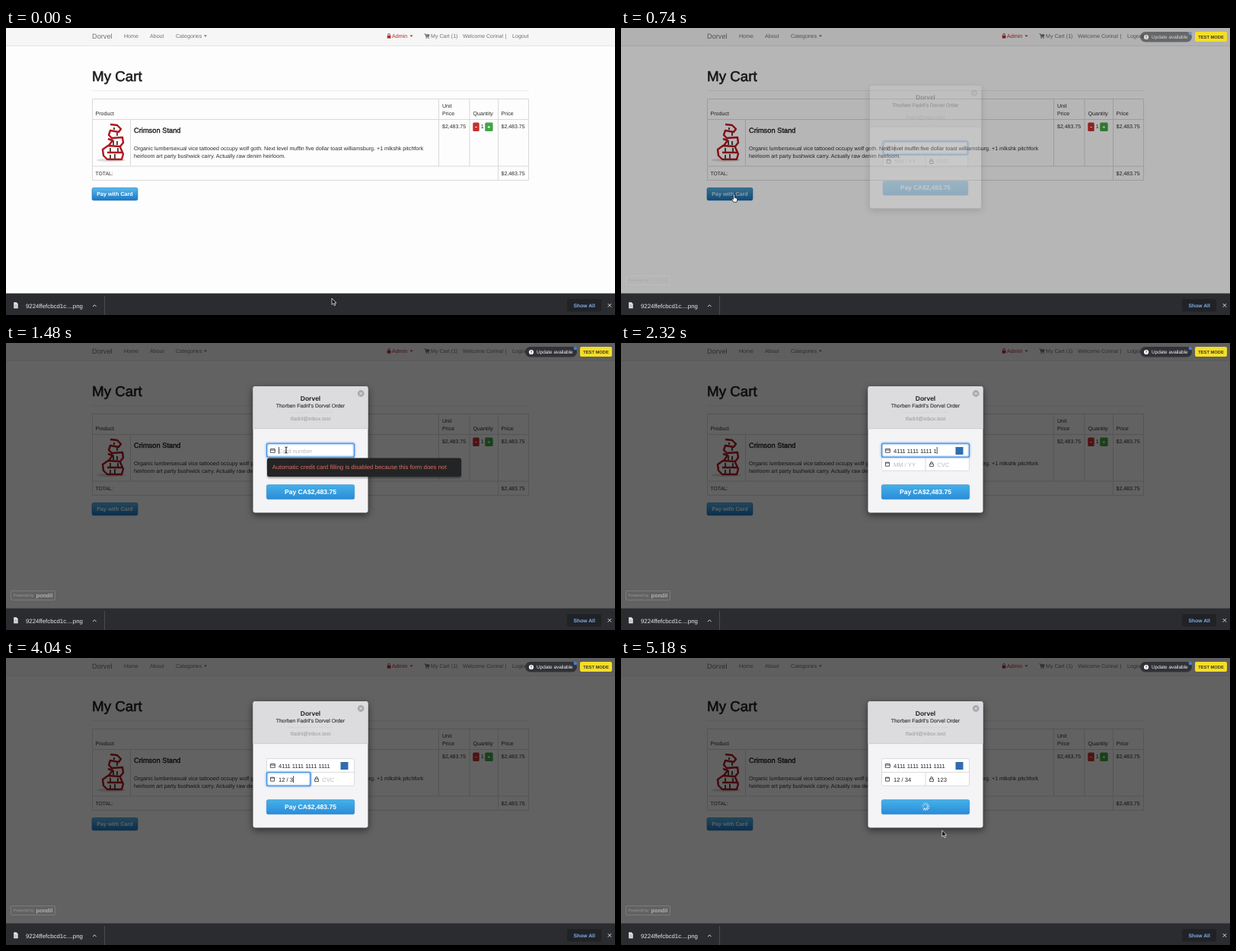
An HTML page that plays this animation: 800 px wide and 378 px high, repeating every 5200 ms.

```html
<!DOCTYPE html>
<html lang="en">
<head>
<meta charset="utf-8">
<title>Cart checkout</title>
<style>
html, body { margin: 0; width: 100%; height: 100%; overflow: hidden; background: #fff; }
svg { display: block; width: 100%; height: 100%; }
text { font: 7.1px "Liberation Sans", Arial, sans-serif; text-rendering: geometricPrecision; white-space: pre; fill: #2b2b2b; }
.nav text { fill: #707070; }
.nav .red { fill: #b3282d; }
.b { font-weight: bold; }
.mid { stroke: currentColor; stroke-width: .3px; }
.c { text-anchor: middle; }
.line { fill: none; stroke: #d9d9d9; }
#modal .in text { font-size: 7.6px; }
.icon { fill: none; stroke: #444; stroke-width: .9; }
</style>
</head>
<body>
<svg viewBox="0 0 800 378">
  <defs>
    <linearGradient id="blue" x2="0" y2="1"><stop stop-color="#58b9ed"/><stop offset="1" stop-color="#1a78c6"/></linearGradient>
    <linearGradient id="pay" x2="0" y2="1"><stop stop-color="#45b1e9"/><stop offset="1" stop-color="#2a8bd8"/></linearGradient>
    <filter id="soft" x="-30%" y="-30%" width="160%" height="160%"><feGaussianBlur stdDeviation="5"/></filter>
    <filter id="glow" x="-20%" y="-60%" width="140%" height="220%"><feGaussianBlur stdDeviation="1"/></filter>
  </defs>

  <rect width="800" height="350" fill="#fdfdfd"/>
  <g class="nav">
    <rect width="800" height="23" fill="#f6f6f6"/>
    <path d="M0 23.5H800" stroke="#e6e6e6"/>
    <text x="113" y="14" style="font-size:9.2px">Dorvel</text>
    <text x="155" y="13">Home</text>
    <text x="189" y="13">About</text>
    <text x="223" y="13">Categories</text>
    <path d="M260 9.5h4l-2 2.3z" fill="#666"/>
    <path d="M500.8 10h4.6v3.6h-4.6z" fill="#b3282d"/>
    <path d="M501.8 10v-1.3a1.3 1.3 0 0 1 2.6 0V10" fill="none" stroke="#b3282d" stroke-width=".9"/>
    <text class="red" x="507" y="13">Admin</text>
    <path d="M530.5 9.5h4l-2 2.3z" fill="#b3282d"/>
    <path d="M549.5 7.8h1.5l.8 4h3.8M551.3 8.8h4.8l-.5 2h-4z" fill="#666" stroke="#666" stroke-width=".7"/>
    <circle cx="552.2" cy="13.2" r=".8" fill="#666"/><circle cx="555.2" cy="13.2" r=".8" fill="#666"/>
    <text x="558" y="13">My Cart (1)</text>
    <text x="600" y="12.5" style="font-size:7px">Welcome Corina! |</text>
    <text x="665" y="13">Logout</text>
  </g>

  <text class="mid" x="113" y="70" style="font-size:18.8px;stroke-width:.5px">My Cart</text>
  <path d="M113 82.5H687" stroke="#ececec"/>
  <path class="line" d="M113.5 93.5H686.5V200.5H113.5ZM113.5 120.5H686.5M113.5 182H686.5M163.5 120.5V182M568.5 93.5V182M609 93.5V182M646.5 93.5V200.5"/>
  <g class="b">
    <text x="117.5" y="114.5">Product</text>
    <text x="573" y="105">Unit</text>
    <text x="573" y="114.5">Price</text>
    <text x="613.5" y="114.5">Quantity</text>
    <text x="650.5" y="114.5">Price</text>
    <text x="117.5" y="193.5" style="font-size:6.8px">TOTAL:</text>
    <text x="650.5" y="193.5" style="font-size:7px">$2,483.75</text>
  </g>
  <text class="mid" x="168" y="138" style="font-size:9.3px">Crimson Stand</text>
  <text x="168" y="161.3" style="font-size:7.15px">Organic lumbersexual vice tattooed occupy wolf goth. Next level muffin five dollar toast williamsburg. +1 mlkshk pitchfork</text>
  <text x="168" y="170.8" style="font-size:7.15px">heirloom art party bushwick carry. Actually raw denim heirloom.</text>
  <text x="573" y="132" style="font-size:7px">$2,483.75</text>
  <text x="650.5" y="132" style="font-size:7px">$2,483.75</text>
  <rect x="613.3" y="124.5" width="8.4" height="11.5" rx="1.5" fill="#c6302c"/>
  <path d="M616.2 130.5h2.6M632.6 130.5h3.2M634.2 129v3" stroke="#fff" stroke-width=".9"/>
  <text x="623.8" y="132.3">1</text>
  <rect x="629.2" y="124.5" width="10.4" height="11.5" rx="1.5" fill="#41a546"/>
  <path d="M632.6 130.5h3.4M634.3 128.8v3.4" stroke="#fff" stroke-width=".9"/>

  <g fill="none" stroke="#b3141f" stroke-width="2.4" stroke-linejoin="round">
    <ellipse cx="138" cy="174" rx="19" ry="2.2" fill="#ddd" stroke="none"/>
    <path d="M137 127l9 1 5 5-3 4-11-2-2 6 4 4 14-1 1 7-4 5-16-1-7 5 1 8 5 5h19l2-7-4-9M134 146l6 2-5 7M133 164h20"/>
    <path d="M142 134v-3M146 142v-4M141 154v-6M146 154v-5M137 163v-5M147 163v-5M137 172v-5M143 172v-6" stroke="#5a4a40" stroke-width="2"/>
  </g>

  <rect x="113" y="210.5" width="60" height="16.5" rx="2" fill="url(#blue)" stroke="#2476b5" stroke-width=".6"/>
  <text class="b c" x="143" y="221.3" style="font-size:7.2px;fill:#fff">Pay with Card</text>
  <rect id="press" x="113" y="210.5" width="60" height="16.5" rx="2" opacity=".15"/>

  <rect id="shade" width="800" height="350"/>
  <g id="extras">
    <rect x="6.5" y="326.5" width="58" height="12" rx="1.5" fill="none" stroke="#fff" stroke-opacity=".16"/>
    <text x="9.5" y="334" style="font-size:5.1px;fill:#989898">Powered by</text>
    <text class="b" x="39.5" y="335" style="font-size:7.3px;fill:#b0b0b0">pondil</text>
    <rect x="682" y="5" width="68" height="13.5" rx="6.7" fill="#303237"/>
    <circle cx="690" cy="12" r="3.1" fill="#fff"/>
    <path d="M690 10v2.3M690 13.2v.9" stroke="#303237" stroke-width=".9"/>
    <text x="697" y="14.2" style="font-size:6.4px;fill:#f4f4f4">Update available</text>
    <circle cx="747.8" cy="7.2" r="2.1" fill="#3f80dd"/>
  </g>
  <g id="mode">
    <rect x="754" y="5" width="42" height="13" rx="2" fill="#f4de29"/>
    <text class="b c" x="775" y="13.8" style="font-size:5.75px;fill:#39361b">TEST MODE</text>
  </g>

  <g id="modal">
    <rect x="324" y="60" width="152" height="167" rx="4" opacity=".5" filter="url(#soft)"/>
    <rect x="324.5" y="57" width="151" height="166.5" rx="3" fill="#f4f3f5"/>
    <path d="M324.5 113V60a3 3 0 0 1 3-3h145a3 3 0 0 1 3 3v53z" fill="#dcdbde"/>
    <path d="M324.5 112.7h151" stroke="#c6c5c8" stroke-width=".7"/>
    <path d="M370 91.3h60" stroke="#d0cfd2" stroke-width=".6"/>
    <circle cx="466.2" cy="66.5" r="4.4" fill="#aaa9ad"/>
    <path d="M464.6 64.9l3.2 3.2m0-3.2l-3.2 3.2" stroke="#eee" stroke-width=".9"/>
    <text class="b c" x="400" y="75.7" style="font-size:8.5px;fill:#222">Dorvel</text>
    <text class="mid c" x="400" y="85.2" style="font-size:6.85px;fill:#484848;color:#484848;stroke-width:.22px">Thorben Fadril's Dorvel Order</text>
    <text class="c" x="400" y="102" style="font-size:6.8px;fill:#98979b">tfadril@inbox.test</text>
    <g class="in">
      <rect x="342.5" y="132.5" width="115" height="35.7" rx="2" fill="#fff" stroke="#d3d2d5" stroke-width=".8"/>
      <path d="M342.5 150.5h115M400 150.5v17.7" stroke="#d3d2d5" stroke-width=".8"/>
      <g id="ring" fill="none" stroke="#3f8fe4">
        <rect rx="2" stroke-width="2" opacity=".7" filter="url(#glow)"/>
        <rect rx="2" stroke-width="1.1"/>
      </g>
      <path class="icon" d="M347.3 139.5h6v4.8h-6zM347.3 141.2h6M347.5 157.2h5v5h-5zM347.5 158h5M405.6 159.2h4.8v3.4h-4.8zM406.6 159v-1a1.4 1.4 0 0 1 2.8 0v1"/>
      <text id="card" x="358" y="144.6"/>
      <text id="date" x="358" y="162.5"/>
      <text id="code" x="415.3" y="162.5"/>
      <rect id="caret" width=".8" height="9" fill="#222"/>
      <rect id="badge" x="439.5" y="137" width="10" height="10" fill="#2f6db0"/>
    </g>
    <rect x="342.3" y="186.7" width="115.4" height="19" rx="2" fill="url(#pay)" stroke="#2c83c4" stroke-width=".6"/>
    <text id="payText" class="b c" x="400" y="198.7" style="font-size:8.55px;fill:#fff">Pay CA$2,483.75</text>
    <g id="spin" stroke="#fff" stroke-width="1" stroke-linecap="round"/>
  </g>

  <g id="tip">
    <rect x="343" y="153" width="255" height="25" rx="3" opacity=".35" filter="url(#glow)"/>
    <rect x="343" y="151.5" width="255" height="24.5" rx="2.5" fill="#232425"/>
    <text x="349.7" y="166.4" style="font-size:7.83px;fill:#dd6c62">Automatic credit card filling is disabled because this form does not</text>
  </g>

  <rect y="349.5" width="800" height="28.5" fill="#2a2c30"/>
  <path d="M10.2 361.3h3.5l2 2v5.9h-5.5z" fill="#e2e3e5"/>
  <path d="M11.4 365h3M11.4 367h3" stroke="#777" stroke-width=".6"/>
  <text x="26" y="368.5" style="font-size:7.85px;fill:#e8e9eb">9224ffefcbcd1c....png</text>
  <path d="M114 367l2.3-2.3 2.3 2.3M790.6 363l4.6 4.6m0-4.6l-4.6 4.6" fill="none" stroke="#d4d5d8"/>
  <path d="M129.5 353V378" stroke="#4a4c50"/>
  <rect x="737" y="357" width="45" height="16.5" rx="2" fill="#202226"/>
  <text class="b c" x="759.7" y="367.6" style="font-size:6.75px;fill:#82ade9">Show All</text>

  <g id="cursor">
    <path d="M0 0V8.4L2 6.6 3.4 9.6 4.8 9 3.5 6.1H6Z" fill="#111" stroke="#fff" stroke-width=".7"/>
    <path d="M-.8 .8C-.8-.4 .9-.4 .9 .8V4l3.3 1v2.3L3.4 9.8H-.6L-2.6 6.6C-3 5.6-2 5-1.4 5.6l.6.7z" fill="#fff" stroke="#111" stroke-width=".7"/>
    <path d="M-1.7-4Q0-4 0-3Q0-4 1.7-4M0-3V3M-1.7 4Q0 4 0 3Q0 4 1.7 4" fill="none" stroke="#111" stroke-width="1"/>
  </g>
</svg>
<script>
const $ = id => document.getElementById(id);
const LOOP = 5200;
const clamp = v => Math.max(0, Math.min(1, v));
const ramp = (t, a, b) => clamp((t - a) / (b - a));
const set = (el, attrs) => { for (const k in attrs) el.setAttribute(k, attrs[k]); };
const show = (id, on) => $(id).setAttribute('display', on ? 'inline' : 'none');

const ARROW = 0, HAND = 1, BEAM = 2;
// time, x, y
const path = [[0, 428, 356], [120, 428, 356], [540, 148.5, 219.5], [820, 148.5, 219.5],
  [1280, 368, 141], [4740, 368, 141], [4870, 400, 196], [4980, 400, 196], [5120, 421.7, 227], [LOOP, 421.7, 227]];

$('spin').innerHTML = Array.from({ length: 12 }, (_, i) =>
  `<path d="M400 193.2v-2.6" transform="rotate(${i * 30} 400 195.7)"/>`).join('');

function pointer(t) {
  const i = path.findIndex(p => p[0] > t);
  const [t0, x0, y0] = path[i - 1], [t1, x1, y1] = path[i];
  const k = ramp(t, t0, t1), e = k * k * (3 - 2 * k);
  return [x0 + (x1 - x0) * e, y0 + (y1 - y0) * e];
}

function pointerKind(x, y, t) {
  if (t < 820) return x < 173 && y < 227 ? HAND : ARROW;
  if (y > 186 && y < 206 && x > 342) return HAND;
  return x > 343 && x < 457 && y > 132 && y < 168 ? BEAM : ARROW;
}

function field(id, value, hint) {
  $(id).textContent = value || hint;
  $(id).style.fill = value ? '#222' : '#b9b8bc';
}

const typed = (text, t, times) => text.slice(0, times.filter(s => t >= s).length);

function draw(t) {
  const p = ramp(t, 690, 800);
  set($('shade'), { opacity: .61 * p });
  set($('extras'), { opacity: ramp(t, 660, 800) });
  show('mode', t >= 660);
  show('press', t >= 540 && t < 820);
  set($('modal'), {
    opacity: p ** 1.75,
    transform: `translate(400 ${140.25 + 31 * (1 - p)}) scale(${.94 + .06 * p}) translate(-400 -140.25)`
  });

  const digits = '4111111111111111'.slice(0, Math.max(0, Math.floor((t - 1700) / 45)));
  const date = typed('1234', t, [2960, 3080, 3620, 4140]);
  const code = typed('123', t, [4480, 4560, 4640]);
  field('card', digits.replace(/(.{4})(?=.)/g, '$1 '), 'Card number');
  field('date', date.length < 2 ? date : '12 / ' + date.slice(2), 'MM / YY');
  field('code', code, 'CVC');
  show('badge', digits);

  const busy = t >= 4940;
  const [id, value, x, y, w] = t < 2520 ? ['card', digits, 342.5, 132.3, 115]
    : t < 4300 ? ['date', date, 342.5, 150.5, 57.5] : ['code', code, 400, 150.5, 57.5];
  for (const r of $('ring').children) set(r, { x, y, width: w, height: 18 });
  show('ring', !busy);
  show('caret', !busy);
  const start = +$(id).getAttribute('x');
  set($('caret'), { x: start + (value ? $(id).getComputedTextLength() : 0), y: y + 4.7 });

  show('tip', t >= 1340 && t < 1700);
  show('payText', !busy);
  show('spin', busy);
  const lead = Math.floor(t / 20);
  [...$('spin').children].forEach((s, i) => set(s, { opacity: 1 - .8 * (((lead - i) % 12 + 12) % 12) / 11 }));

  const [cx, cy] = pointer(t), kind = pointerKind(cx, cy, t);
  set($('cursor'), { transform: `translate(${cx} ${cy})` });
  show('cursor', t < 1745 || t >= 4740);
  [...$('cursor').children].forEach((c, i) => set(c, { display: i === kind ? 'inline' : 'none' }));
}

const origin = performance.now();
function tick() {
  draw((performance.now() - origin) % LOOP);
  requestAnimationFrame(tick);
}
tick();
</script>
</body>
</html>
```
